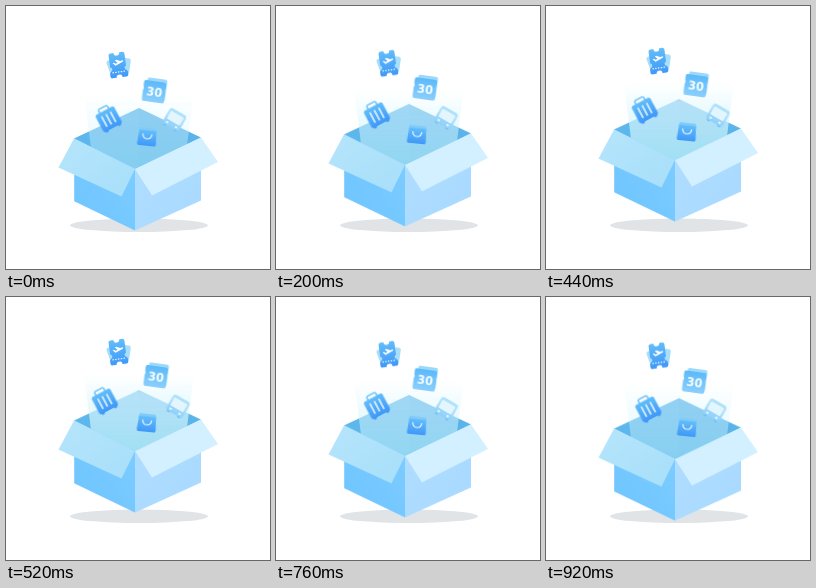
An HTML page without scripts that plays this animation: 264x263 px, repeating every 960 ms.

```html
<!DOCTYPE html>
<html lang="en">
<head>
<meta charset="utf-8">
<title>Floating box</title>
<style>
  html, body { margin: 0; width: 100%; height: 100%; overflow: hidden; background: #fff; }
  svg { display: block; width: 100vw; height: 100vh; }
  .move, .glow { animation: drift 960ms steps(12, end) infinite; }
  .glow { animation-name: glow; }
  .box { --y: -9.8px; }
  .ticket { --y: -4.3px; }
  .calendar { --x: 1.8px; --y: -6.6px; }
  .suitcase { --x: -4.2px; --y: -9.6px; }
  .bus { --x: 3.8px; --y: -4.8px; }
  .bag { --x: -.3px; --y: -5.4px; }
  @keyframes drift {
    50% { transform: translate(var(--x, 0px), var(--y)); }
  }
  @keyframes glow {
    0%, 100% { opacity: .55; }
    50% { opacity: 1; }
  }
  .day { font: bold 11.6px "DejaVu Sans", sans-serif; fill: #f4fcff; text-anchor: middle; }
  .line { fill: none; stroke: #e9f8ff; stroke-linecap: round; }
</style>
</head>
<body>
<svg viewBox="0 0 264 263" preserveAspectRatio="none">
  <defs>
    <linearGradient id="blue" x2="0" y2="1">
      <stop stop-color="#62bdfa"/><stop offset="1" stop-color="#4098f8"/>
    </linearGradient>
    <linearGradient id="page" x2="0" y2="1">
      <stop stop-color="#5cb9f9"/><stop offset="1" stop-color="#8bcffd"/>
    </linearGradient>
    <linearGradient id="sky" x2="0" y2="1">
      <stop stop-color="#b4e4fb"/><stop offset="1" stop-color="#8fd0fb"/>
    </linearGradient>
    <linearGradient id="face" x1="0" y1="1" x2="1" y2="0">
      <stop stop-color="#6ec5ff"/><stop offset="1" stop-color="#7ecdff"/>
    </linearGradient>
    <linearGradient id="side" x2="1" y2="1">
      <stop stop-color="#b0deff"/><stop offset="1" stop-color="#a8d9ff"/>
    </linearGradient>
    <linearGradient id="flap" x2="1" y2="1">
      <stop stop-color="#b5e5fc"/><stop offset="1" stop-color="#a8dffa"/>
    </linearGradient>
    <linearGradient id="beam" gradientUnits="userSpaceOnUse" x1="0" y1="86" x2="0" y2="160">
      <stop stop-color="#f0fcff" stop-opacity="0"/>
      <stop offset=".25" stop-color="#e8faff" stop-opacity=".66"/>
      <stop offset="1" stop-color="#b4ebf6" stop-opacity=".82"/>
    </linearGradient>
  </defs>

  <ellipse cx="133" cy="219.3" rx="69" ry="6.8" fill="#e1e4e7"/>

  <g class="move box">
    <path d="M68 132.6 133 102V163H129Z" fill="#5eb7ec"/>
    <path d="M133 102 195 131.5 133 163Z" fill="#5ab4ea"/>
    <path class="glow" d="M78 86H188L181 139 129 163 85 142Z" fill="url(#beam)"/>
  </g>

  <g class="move ticket">
    <g transform="translate(112 59.5)">
      <rect x="-10" y="-8" width="12" height="17" rx="2" transform="rotate(-20)" fill="#a9def9"/>
      <rect x="2" y="-8.5" width="10" height="16" rx="2" transform="rotate(8)" fill="#a9def9"/>
      <g transform="rotate(-8)">
        <path d="M-6-13H-3A3 3 0 0 0 3-13H6Q8-13 8-11V1A2.3 2.3 0 0 0 8 5.5L9 7V10Q9 12 7 12H3A3 3 0 0 0-3 12H-7Q-9 12-9 10V7L-8 5.5A2.3 2.3 0 0 0-8 1V-11Q-8-13-6-13Z" fill="url(#blue)"/>
        <path d="M-5-3-3.8-3.3-2-2 0-2.8-2.5-5.5-1-6 3-4 5-4.7Q6.5-4.4 5.5-3.3L-2.5 0Z" fill="#fff"/>
        <path class="line" d="M-6 6.5H6" stroke-width="1.3" stroke-dasharray=".4 2.4"/>
      </g>
    </g>
  </g>

  <g class="move calendar">
    <g transform="translate(148.4 85.3) rotate(8)">
      <rect x="-8.5" y="-13" width="20" height="22" rx="2" fill="#9ad9fb"/>
      <path d="M-10-10H9Q11-10 11-8V-4Q9.5-2 11 0V9Q11 11 9 11H-9.5Q-11.5 11-11.5 9V0Q-10-2-11.5-4V-8Q-11.5-10-10-10Z" fill="url(#page)"/>
      <text class="day" y="5">30</text>
    </g>
  </g>

  <g class="move suitcase">
    <g transform="translate(102.6 113) rotate(-28)">
      <path d="M-5-9V-11.5Q-5-13 -3.5-13H3.5Q5-13 5-11.5V-9" fill="none" stroke="#74c4f9" stroke-width="1.6"/>
      <path d="M-7 9V11.3M7 9V11.3" stroke="#4098f5" stroke-width="3"/>
      <rect x="-10.5" y="-9.5" width="21" height="19.5" rx="2" fill="url(#blue)"/>
      <path class="line" d="M-5-5V5.5M0-5V5.5M5-5V5.5" stroke-width="1.5"/>
    </g>
  </g>

  <g class="move bus">
    <g transform="translate(168.6 113.5) rotate(30)">
      <path d="M-6 7V10M6 7V10" stroke="#69b9f6" stroke-width="3"/>
      <rect x="-9.5" y="-9" width="19" height="18" rx="3" fill="url(#sky)"/>
      <rect x="-7.5" y="-6" width="15" height="9" rx="1.2" fill="#e3f6fe"/>
      <path class="line" d="M-5.5 6H-4.8M4.8 6H5.5" stroke-width="2"/>
    </g>
  </g>

  <g class="move bag">
    <g transform="translate(141.2 130.8) rotate(6)">
      <path d="M-8-9H8L9-5H-9Z" fill="#82cbf9"/>
      <path d="M-8.5-6.5H8.5L9.5 7Q9.5 9 8 9H-8Q-9.5 9-9.5 7Z" fill="url(#blue)"/>
      <path class="line" d="M-4.5-2.5Q-4 2 0 2T4.5-2.5" stroke-width="1.2"/>
    </g>
  </g>

  <g class="move box">
    <path d="M68.2 132.6 129 163V224.4L68.2 195.3Z" fill="url(#face)"/>
    <path d="M195 131.5 129 163V224.4L195 194.4Z" fill="url(#side)"/>
    <path d="M68 132.6 129 163 115.5 190.5 52.5 161.5Z" fill="url(#flap)"/>
    <path d="M195 131.5 129 163 146 189.5 212 156Z" fill="#d2f0ff"/>
  </g>
</svg>
</body>
</html>
```
